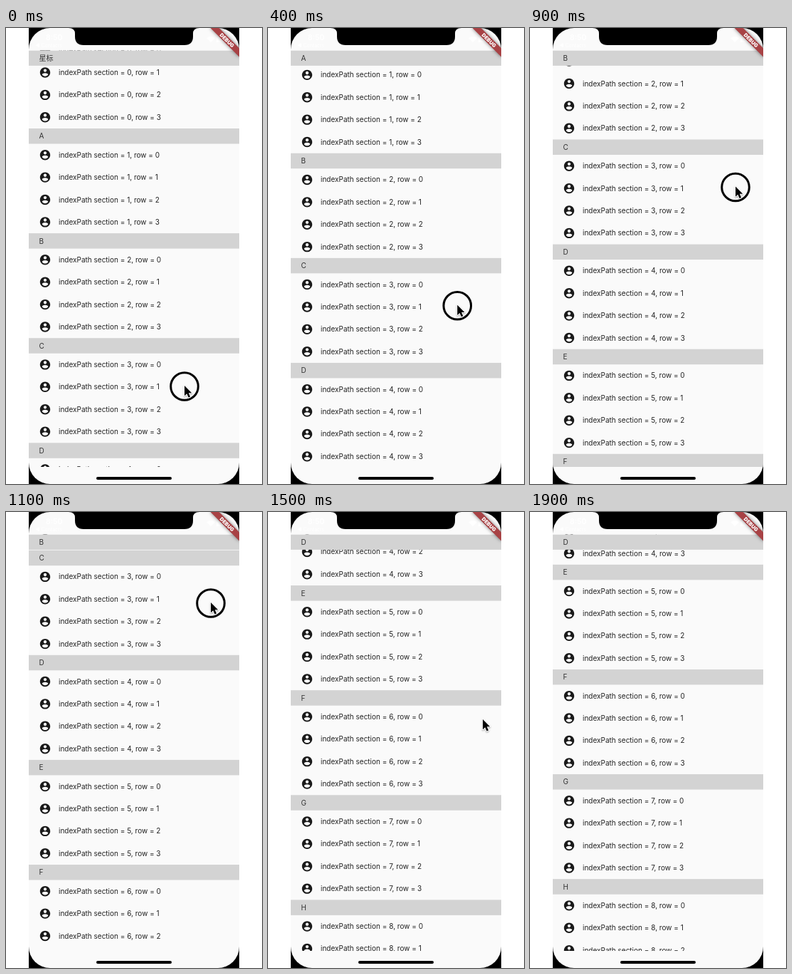
Animation of 360x640 px, one loop 2 s. Source, as an HTML page with a canvas:

```html
<!DOCTYPE html>
<html lang="zh">
<head>
<meta charset="utf-8">
<title>Sticky section list</title>
<style>
  html, body { margin: 0; width: 100%; height: 100%; overflow: hidden; background: #fff; }
  canvas { display: block; }
</style>
</head>
<body>
<canvas id="stage" width="360" height="640"></canvas>
<script>
const ctx = document.getElementById('stage').getContext('2d');
const LOOP = 2000, STEP = 100;
const LEFT = 32, WIDTH = 296, RIGHT = LEFT + WIDTH;
const LIST_TOP = 31.4, LIST_BOTTOM = 616;
const HEADER = 21.5, ROW = 31.4, SECTION = HEADER + 4 * ROW;
const TITLES = ['星标', ...'ABCDEFGHI'];
const FONT = 'Inter, "Noto Sans CJK SC", "Noto Sans CJK", sans-serif';
const PERSON = new Path2D('M12 2C6.48 2 2 6.48 2 12s4.48 10 10 10 10-4.48 10-10S17.52 2 12 2z' +
  'm0 3c1.66 0 3 1.34 3 3s-1.34 3-3 3-3-1.34-3-3 1.34-3 3-3z' +
  'm0 14.2c-2.5 0-4.71-1.28-6-3.22.03-1.99 4-3.08 6-3.08 1.99 0 5.97 1.09 6 3.08-1.29 1.94-3.5 3.22-6 3.22z');
const ARROW = new Path2D('M0 0V14.2L3.3 11.2 5.6 16.6 8.1 15.5 5.8 10.3H10.2z');
const NOTCH = new Path2D('M88 0Q97 0 97 8V12Q97 24 109 24H251Q263 24 263 12V8Q263 0 272 0z');

const DRAG_END = 1300, POINTER_END = 1700;
// time, list scroll
const dragKeys = [[0, 37.5], [200, 92.5], [600, 207.2], [700, 240.5], [800, 277],
  [900, 316.2], [1000, 361], [1100, 419], [1200, 489], [DRAG_END, 560.7]];
// time, pointer x, pointer y
const pointerKeys = [[0, 251, 503], [200, 258, 452.5], [600, 274.5, 327], [900, 289, 223.5],
  [1000, 290, 181], [1100, 288, 128], [1200, 278, 70], [1300, 262, 27],
  [1400, 288, 135], [1500, 302, 292], [1600, 307, 460], [POINTER_END, 300, 608]];

function sample(keys, t) {
  const i = Math.max(1, keys.findIndex(key => key[0] >= t));
  const a = keys[i - 1], b = keys[i], k = (t - a[0]) / (b[0] - a[0]);
  return a.slice(1).map((value, j) => value + (b[j + 1] - value) * k);
}

function scrollAt(t) {
  if (t <= DRAG_END) return sample(dragKeys, t)[0];
  return 560.7 + 134 * (1 - 0.48 ** ((t - DRAG_END) / 100));
}

function label(text, x, y, color, font = '10px') {
  ctx.font = `${font} ${FONT}`;
  ctx.fillStyle = color;
  ctx.fillText(text, x, y);
}

function drawHeader(section, top) {
  ctx.fillStyle = '#d3d3d3';
  ctx.fillRect(LEFT, top, WIDTH, HEADER);
  label(TITLES[section], 46.5, top + HEADER / 2 + 3.7, '#333');
}

function drawRow(section, row, top) {
  const middle = top + ROW / 2;
  ctx.save();
  ctx.translate(55 - 12 * 0.72, middle - 12 * 0.72);
  ctx.scale(0.72, 0.72);
  ctx.fillStyle = '#1b1b1b';
  ctx.fill(PERSON, 'evenodd');
  ctx.restore();
  label(`indexPath section = ${section}, row = ${row}`, 74, middle + 3.5, '#222');
}

function drawList(scroll) {
  ctx.save();
  ctx.beginPath();
  ctx.rect(LEFT, LIST_TOP, WIDTH, LIST_BOTTOM - LIST_TOP);
  ctx.clip();
  TITLES.forEach((_, section) => {
    const top = LIST_TOP + section * SECTION - scroll;
    if (top > LIST_BOTTOM || top + SECTION < LIST_TOP) return;
    for (let row = 0; row < 4; row++) drawRow(section, row, top + HEADER + row * ROW);
    drawHeader(section, Math.min(Math.max(top, LIST_TOP), top + SECTION - HEADER));
  });
  ctx.restore();
}

function drawStatusBar() {
  label('8:50', 56, 17, '#fff', '600 10.5px');
  label('◀ Contacts', 41, 27, '#fff', '7px');
  ctx.fillStyle = '#fff';
  ctx.beginPath();
  ctx.moveTo(288, 20);
  ctx.arc(288, 20, 8, -Math.PI * 0.75, -Math.PI * 0.25);
  ctx.fill();
  ctx.fillRect(296, 13, 14, 7);
}

function drawBanner() {
  ctx.save();
  ctx.translate(RIGHT, 0);
  ctx.rotate(Math.PI / 4);
  ctx.shadowColor = 'rgba(0,0,0,.5)';
  ctx.shadowBlur = 5;
  ctx.fillStyle = '#a84245';
  ctx.fillRect(-28.6, 20, 57.2, 8.6);
  ctx.shadowColor = 'transparent';
  ctx.textAlign = 'center';
  label('DEBUG', 0, 27, '#fff', '900 7.2px');
  ctx.restore();
}

function drawPointer(t) {
  if (t > POINTER_END) return;
  const [x, y] = sample(pointerKeys, t);
  ctx.save();
  ctx.translate(x, y);
  if (t < DRAG_END) {
    ctx.beginPath();
    ctx.arc(0, 0, 19.3, 0, Math.PI * 2);
    ctx.strokeStyle = '#000';
    ctx.lineWidth = 3;
    ctx.stroke();
  }
  ctx.translate(0, -1);
  ctx.strokeStyle = '#fff';
  ctx.lineWidth = 2;
  ctx.lineJoin = 'round';
  ctx.shadowColor = 'rgba(0,0,0,.35)';
  ctx.shadowBlur = 2;
  ctx.shadowOffsetY = 1;
  ctx.stroke(ARROW);
  ctx.shadowColor = 'transparent';
  ctx.fillStyle = '#000';
  ctx.fill(ARROW);
  ctx.restore();
}

function draw(t) {
  ctx.fillStyle = '#fff';
  ctx.fillRect(0, 0, 360, 640);
  ctx.fillStyle = '#000';
  ctx.fillRect(LEFT, 0, WIDTH, 640);

  ctx.save();
  ctx.beginPath();
  ctx.roundRect(LEFT, 0, WIDTH, 640, 30);
  ctx.clip();
  ctx.fillStyle = '#fafafa';
  ctx.fillRect(LEFT, 0, WIDTH, 640);
  drawList(scrollAt(t));
  drawStatusBar();
  drawBanner();
  ctx.restore();

  ctx.fillStyle = '#000';
  ctx.fill(NOTCH);
  ctx.beginPath();
  ctx.roundRect(127, 630, 106, 4, 2);
  ctx.fill();
  drawPointer(t);
}

const start = performance.now();
function tick() {
  const t = (performance.now() - start) % LOOP;
  draw(Math.floor(t / STEP) * STEP);
  requestAnimationFrame(tick);
}
tick();
</script>
</body>
</html>
```
